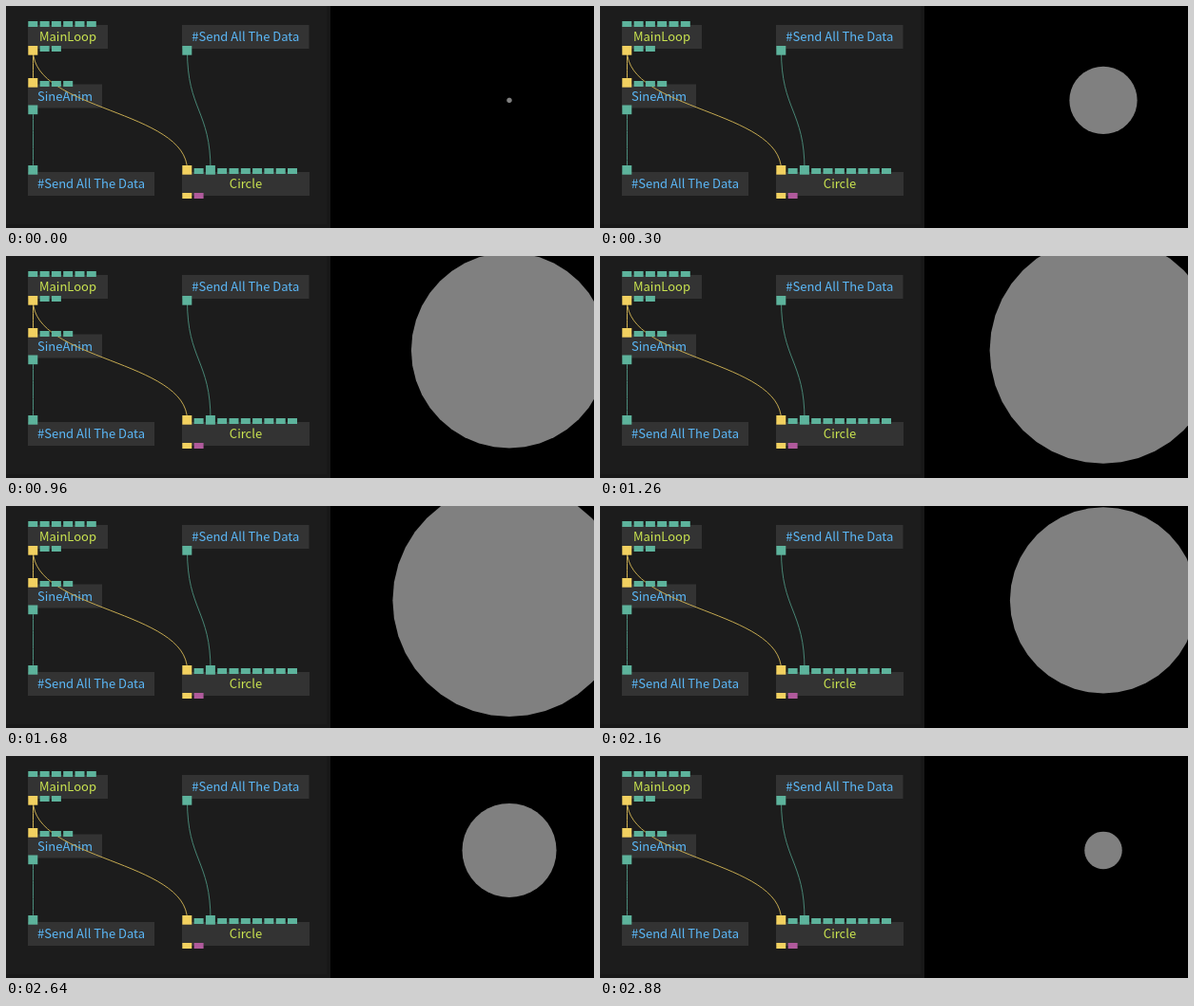
Write an HTML page that moves like this. It is 618 by 234 pixels and loops after 2.94 s.

```html
<!DOCTYPE html>
<html>
<head>
<meta charset="utf-8">
<style>
  html, body { margin: 0; width: 100%; height: 100%; overflow: hidden; background: #1c1c1c; }
  svg { display: block; }
  text { font: 13px "Noto Sans CJK JP", "Noto Sans CJK SC", "Noto Sans CJK", "Open Sans", sans-serif; text-anchor: middle; }
  path { fill: none; stroke-width: 1; }
</style>
</head>
<body>
<svg id="stage" width="618" height="234" viewBox="0 0 618 234"></svg>
<script>
const YELLOW = '#f2d160', GREEN = '#5db39c', PURPLE = '#b05a9c';
const LIME = '#cbe550', BLUE = '#5bb8f8';
const stage = document.getElementById('stage');

function add(tag, attrs, label = '') {
  const el = document.createElementNS('http://www.w3.org/2000/svg', tag);
  for (const key in attrs) el.setAttribute(key, attrs[key]);
  el.textContent = label;
  stage.append(el);
  return el;
}

const rect = (x, y, width, height, fill) => add('rect', { x, y, width, height, fill });

function node(x, y, width, label, fill) {
  rect(x, y, width, 25, '#333');
  add('text', { x: x + width / 2, y: y + 17, fill }, label);
}

// Curved link that leaves and arrives vertically
function link(x1, y1, x2, y2, stroke) {
  const mid = (y1 + y2) / 2;
  add('path', { d: `M${x1} ${y1}C${x1} ${mid} ${x2} ${mid} ${x2} ${y2}`, stroke });
}

// y = "g" yellow, uppercase letters are linked (larger) ports
function ports(x, edge, top, kinds) {
  [...kinds].forEach((kind, i) => {
    const linked = kind < 'a';
    const fill = { y: YELLOW, g: GREEN, p: PURPLE }[kind.toLowerCase()];
    const y = top ? edge - (linked ? 7 : 4) : edge - 3;
    rect(x + i * 12.3, y, 10, linked ? 9.7 : 6, fill);
  });
}

rect(337, 0, 4, 234, '#181818');
rect(0, 230, 341, 4, '#181818');
rect(341, 0, 277, 234, '#000');

node(23, 20, 84, 'MainLoop', LIME);
node(185, 20, 133.5, '#Send All The Data', BLUE);
node(23, 82.5, 78, 'SineAnim', BLUE);
node(23, 175, 133, '#Send All The Data', BLUE);
node(185, 175, 134, 'Circle', LIME);

link(28.5, 47, 28.5, 81, '#d0b355');
link(28.5, 47, 190.5, 173, '#c4a950');
link(28.5, 109, 28.5, 173, '#4b8d7c');
link(190.5, 47, 215, 173, '#488675');

ports(23.3, 20, true, 'gggggg');
ports(23.3, 45, false, 'Ygg');
ports(185.3, 45, false, 'G');
ports(23.3, 83, true, 'Yggg');
ports(23.3, 107.5, false, 'G');
ports(23.3, 175, true, 'G');
ports(185.3, 175, true, 'YgGggggggg');
ports(185.3, 200, false, 'yp');

const SEGMENTS = 40, STEP = 60, LOOP = 2940;
const disc = add('polygon', { fill: '#808080' });

function draw(now) {
  const time = Math.floor(now % LOOP / STEP) * STEP / 1000;
  const radius = 124.2 * Math.abs(Math.sin(1.043 * time - 0.022));
  const points = Array.from({ length: SEGMENTS }, (_, i) => {
    const angle = i / SEGMENTS * 2 * Math.PI;
    return `${529 + radius * Math.cos(angle)},${99.4 + radius * Math.sin(angle)}`;
  });
  disc.setAttribute('points', points.join(' '));
}

const start = performance.now();
function tick() {
  draw(performance.now() - start);
  requestAnimationFrame(tick);
}
tick();
</script>
</body>
</html>
```
